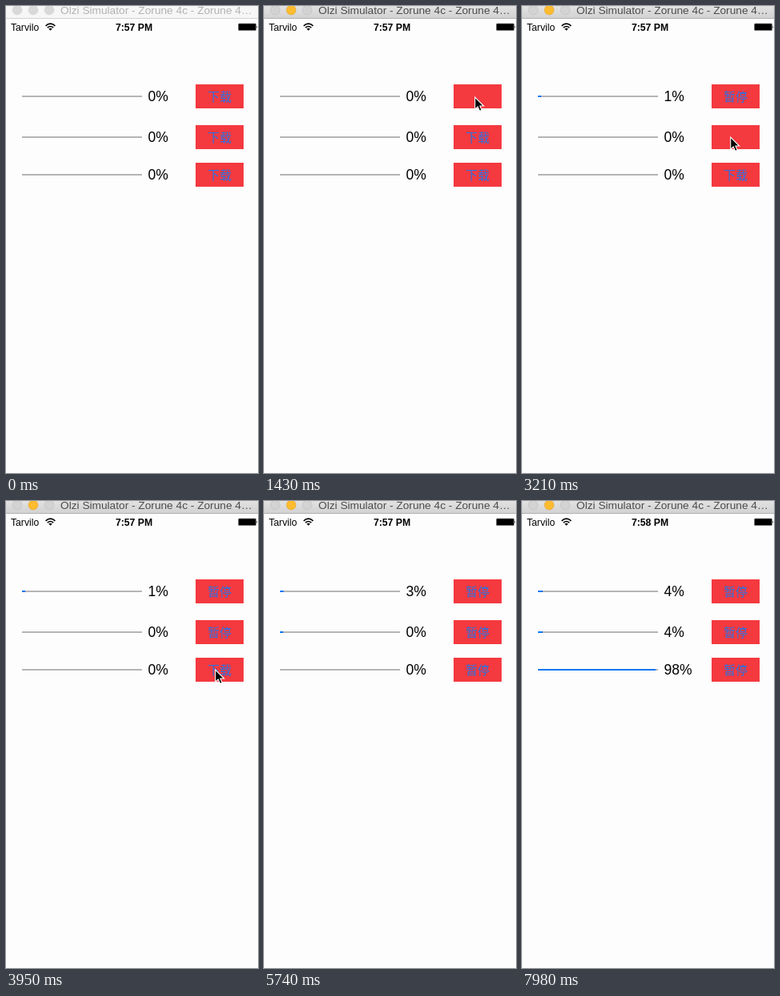
An HTML page that plays this animation: 315 px wide and 584 px high, repeating every 8 s.

```html
<!DOCTYPE html>
<html lang="zh">
<head>
<meta charset="utf-8">
<title>Downloads</title>
<style>
  html, body { margin: 0; width: 100%; height: 100%; overflow: hidden; background: #fdfdfd; }
  svg { display: block; width: 100%; height: 100%; font-family: "Liberation Sans", Arial, sans-serif; }
  #title { font-size: 13.7px; fill: #b2b2b2; }
  #bar { fill: #f6f6f6; }
  #edge { fill: #d2d2d2; }
  .light { fill: #d9d9d9; stroke: #cfcfcf; stroke-width: .6; }
  .active #title { fill: #4b4b4b; }
  .active #bar { fill: url(#chrome); }
  .active #edge { fill: #b1b1b1; }
  .active .light { fill: #d3d3d3; stroke: #bcbcbc; }
  .active .mid { fill: #fdbc2f; stroke: #e0a028; }
  .status { font-size: 12.2px; }
  .percent { font-size: 17.5px; }
  .label { font: 15px "Noto Sans CJK SC", "Noto Sans CJK", sans-serif; text-anchor: middle; fill: #2b70e0; }
  .track { fill: #b5b5b5; }
  .done { fill: #0a76f5; }
  .button { fill: #f4393f; }
</style>
</head>
<body>
<svg id="stage" viewBox="0 0 315 584">
  <defs>
    <linearGradient id="chrome" x1="0" y1="0" x2="0" y2="1">
      <stop offset="0" stop-color="#e2e2e2"/>
      <stop offset="1" stop-color="#d2d2d2"/>
    </linearGradient>
  </defs>
  <rect width="315" height="584" fill="#fdfdfd"/>
  <rect id="bar" width="315" height="15"/>
  <rect id="edge" y="15" width="315" height="1"/>
  <circle class="light" cx="14" cy="5" r="5.9"/>
  <circle class="light mid" cx="34" cy="5" r="5.9"/>
  <circle class="light" cx="54" cy="5" r="5.9"/>
  <text id="title" x="68" y="10">Olzi Simulator - Zorune 4c - Zorune 4…</text>

  <text class="status" x="6" y="31">Tarvilo</text>
  <g fill="none" stroke="#000" stroke-width="1.6">
    <path d="M49.6 24.8Q55.5 19.4 61.4 24.8M51.8 27.2Q55.5 23.8 59.2 27.2"/>
    <path d="M53.3 28.5Q55.5 26.8 57.7 28.5L55.5 30.8Z" fill="#000" stroke="none"/>
  </g>
  <text id="clock" class="status" x="160" y="31" text-anchor="middle" font-weight="bold"></text>
  <rect x="290.5" y="22" width="22" height="8.6" rx="1.2" fill="#000" stroke="#777" stroke-width=".8"/>
  <path d="M313.4 24.6q1.4 1.7 0 3.4z"/>

  <g id="rows"></g>
  <path id="pointer" d="M.7 1V16.2L4.2 13L6.6 18.4L9.2 17.3L6.9 12H11.6Z" stroke="#fff" stroke-width="1.1"/>
</svg>
<script>
  const LOOP = 8000;
  const $ = id => document.getElementById(id);
  const stage = $("stage"), clock = $("clock"), pointer = $("pointer");

  // Latest value of a [time, value] track
  const at = (track, t) => track.reduce((v, [when, next]) => t >= when ? next : v, track[0][1]);

  const items = [
    { y: 113, press: 1430, start: 1730, percent: [[0, 0], [2460, 1], [4100, 2], [5440, 3], [7240, 4]] },
    { y: 164, press: 3210, start: 5290, percent: [[0, 0], [5890, 1], [6340, 2], [7090, 3], [7530, 4]] },
    { y: 211, press: 4990, start: 7090, percent: [[0, 0]] }
  ];
  // The last download races ahead in even steps
  [7090, 7240, 7390, 7530, 7680, 7830, 7980].forEach((t, i) => items[2].percent.push([t, 14 * (i + 1)]));

  const moves = [
    [0, null], [500, [283, 133]], [650, [274, 123]], [800, [266, 116]], [950, [263, 113]],
    [2030, [262, 128]], [2180, [260, 147]], [2320, [260, 162]], [2610, [260, 163]],
    [3810, [260, 190]], [3950, [261, 210]], [4100, [260, 212]],
    [5590, null], [6190, [302, 269]], [6340, null]
  ];

  $("rows").innerHTML = items.map(({ y }) => `<g>
    <rect class="track" x="20" y="${y - 1}" width="150" height="2"/>
    <rect class="done" x="20" y="${y - 1}" height="2"/>
    <text class="percent" x="177.5" y="${y + 6}"></text>
    <rect class="button" x="237" y="${y - 15}" width="60" height="30"/>
    <text class="label" x="267" y="${y + 6}"></text></g>`).join("");
  [...$("rows").children].forEach((g, i) => {
    for (const part of ["done", "percent", "label"])
      items[i][part + "El"] = g.querySelector("." + part);
  });

  function drawItem(item, t) {
    const p = at(item.percent, t);
    const { press } = item;
    item.doneEl.setAttribute("width", t < item.start ? 0 : Math.max(4, p * 1.5));
    item.percentEl.textContent = p + "%";
    item.labelEl.textContent = t < press ? "下载" : "暂停";
    item.labelEl.setAttribute("opacity", at([[0, 1], [press, 0], [press + 150, .5], [press + 300, 1]], t));
  }

  function draw(t) {
    stage.classList.toggle("active", t >= 1430);
    clock.textContent = t < 6040 ? "7:57 PM" : "7:58 PM";
    items.forEach(item => drawItem(item, t));
    const pos = at(moves, t);
    pointer.setAttribute("visibility", pos ? "visible" : "hidden");
    if (pos) pointer.setAttribute("transform", `translate(${pos})`);
  }

  const begin = performance.now();
  function tick() {
    draw((performance.now() - begin) % LOOP);
    requestAnimationFrame(tick);
  }
  tick();
</script>
</body>
</html>
```
